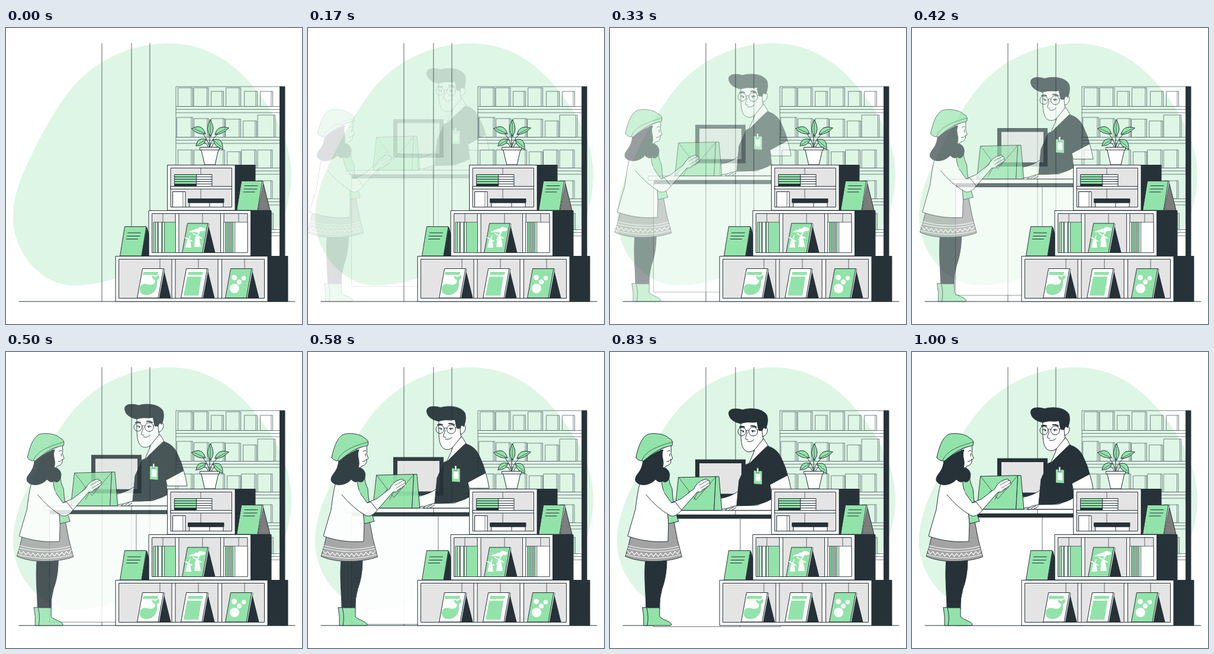
These frames come from a looping animation (500 by 500 pixels, 1.04 s). An HTML page:

```html
<!DOCTYPE html>
<html lang="en">
<head>
<meta charset="utf-8">
<title>Bookshop counter</title>
<style>
html, body { margin: 0; width: 100%; height: 100%; overflow: hidden; background: #fff; }
svg { display: block; width: 100%; height: 100%; stroke: #263238; stroke-width: 1; stroke-linejoin: round; stroke-linecap: round; fill: none; }
.w { fill: #fff; }
.g { fill: #92e3a9; }
.d { fill: #263238; }
.i { fill: #e4e4e4; }
.n { stroke: none; }
.thin { stroke-width: .7; }
.back { stroke: #56666a; stroke-width: .8; }
</style>
</head>
<body>
<svg viewBox="0 0 500 500">
  <path class="n" fill="#def6e5" d="M272 26C340 24 390 62 425 108C460 152 482 200 482 247C482 300 462 350 430 365C350 395 270 390 190 421C165 430 135 435 113 435C60 434 12 380 12 320C12 290 22 260 30 243C53 192 78 144 107 107C145 58 205 27 272 26Z"/>
  <path d="M162 26V462M212 26V462M243 26V462" stroke="#455358" stroke-width=".9"/>
  <g id="bookcase" class="back"></g>
  <path class="d" d="M463 99h8v286h-8z"/>
  <path d="M22 462H488" stroke-width="1.2"/>

  <g class="drop">
    <path class="d n" d="M144 179.500h85v65h-85z"/>
    <path class="i n" d="M151 186h71v51.500h-71z"/>
  </g>

  <g class="drop">
    <path class="w thin" d="M74 279h214v183H74zM220 279V462"/>
    <path class="w thin" d="M65 266h222v7H65zM212 266v7"/>
    <path class="d n" d="M74 273h214v6.500H74z"/>
  </g>

  <g class="drop">
    <path class="w" d="M217 233C208 240 198 243 186 246V264C198 262 208 262 215 257Z"/>
    <path class="w" d="M246 158L242 170L234 188L268 158L260 145Z"/>
    <path class="w" d="M270 222L300 206Q304 218 306 232H273Z"/>
    <path class="w" d="M214 258L248 257L274 246V265.500H194Q202 259 214 258M201 264l8-4M206 265l7-4"/>
    <path class="d" d="M266 157C281 161 287 171 291 181Q297 193 300 206L270 222L273 246C260 256 232 259 214 257L218 215L230 188L236 186L251 171Z"/>
    <path class="w" d="M221 119C221 137 220 154 226 162C231 169 241 168 246 161L258 146L261 122L251 113Z"/>
    <path class="w" d="M257 126Q265 121 266 130Q266 138 258 141Z"/>
    <path class="d" d="M201 104C198 94 211 92 224 96C236 92 258 93 265 105C268 114 265 123 263 128Q259 123 257 131H252C249 126 250 121 248 116C241 119 228 114 221 119C211 117 202 112 201 104Z"/>
    <g fill="none">
      <circle cx="223" cy="132.500" r="7"/><circle cx="242" cy="132.500" r="7.500"/>
      <path d="M230 131q2-2 5 0M249 130l9-2M232 134q-4 10-3 11q2 2 4 1M232 149q7 2 11-3"/>
      <path d="M219 125q4-2 8 0M238 123q5-1 9 2" stroke-width="2"/>
      <path d="M221 131q3-1 5 1M239 131q3-1 6 1" stroke-width="1.300"/>
    </g>
    <circle class="d n" cx="225" cy="132.500" r="1.300"/><circle class="d n" cx="241" cy="132.500" r="1.300"/>
    <path class="g thin" d="M243 198l14 1v23l-14-1z"/>
    <path class="w n" d="M246 204l8 .5v12l-8-.5z"/>
    <path class="w thin" d="M248 194h3v8h-3z"/>
  </g>

  <g class="drop">
    <path class="g" d="M116 210L179 208.500L176 265.500H110Z"/>
    <path class="g" d="M179 208.500H184L189 265.500H176Z"/>
    <path class="thin" d="M116 210L145 248L179 208.500M110 265L134 234"/>
  </g>

  <g id="visitor">
    <path class="d" d="M58 350H94C94 374 90 389 86 400Q81 417 82 434H59C59 410 55 380 58 350Z"/>
    <path class="g" d="M53 432L63 431V462H55Q56 446 53 432Z"/>
    <path class="g" d="M60 432H82V447C87 453 99 454 102 460L101 462H61Q64 447 60 432Z"/>
    <path fill="#a3a3a3" d="M33 312Q29 330 24 345C50 357 92 356 119.500 346Q111 317 106 286L96 289Z"/>
    <g stroke="#fff" stroke-width="1.200">
      <path d="M29 327Q74 339 114 328M28 331Q74 343 115 332M25 342Q74 355 118 342"/>
      <path id="zigzag"/>
    </g>
    <path class="w" d="M84 164L101 157Q102 168 101 172L104 180L101 182Q102 191 92 193L86 202L80 180Z"/>
    <path class="w" d="M49 220C45 234 43 250 41 266Q34 290 28 311C48 318 70 322 96 320L97 288L92 220L78 215Z"/>
    <path class="g" d="M86 208L98 210Q97 219 103 231Q104 260 114 286L97 290Q95 255 86 225Z"/>
    <path class="w" d="M101 255L118 248L140 231C144 222 151 217 159 215Q164 214 163 217Q168 217 166 221Q169 224 163 227Q163 230 157 232L152 236L145 237L118 268Z"/>
    <path class="w n" d="M62 229C74 216 86 228 90 238L102 255L108 253L119 267C112 276 105 279 99 276L58 241Z"/>
    <path d="M90 238L102 255L108 253L119 267C112 276 105 279 99 276Q78 264 59 241"/>
    <path class="thin" d="M149 225l14-8M151 230l15-9M152 234l11-7M140 249l7-13"/>
    <path class="d" d="M54 181C68 176 77 167 88 165C83 177 91 182 87 195C94 195 101 203 98 212C96 220 91 221 87 218Q81 222 75 215C66 226 46 228 41 217C40 205 53 205 54 181Z"/>
    <path class="g" d="M42 178C45 164 50 145 62 139C72 136 90 138 97 145Q106 149 103 158C84 161 71 170 55 184Q44 184 42 178Z"/>
    <path d="M52 183C58 166 82 158 104 152" class="thin"/>
    <path d="M95 168q3-3 5-1M94 185q5 0 7-4M99 172v4"/>
  </g>

  <g id="stand"></g>
  <g id="plant">
    <path d="M344 202Q341 185 326 172M344 202V163M344 202Q347 184 367 172M342 202Q339 190 327 195M347 202Q349 192 361 193"/>
    <path class="g" d="M345 155Q355 171 345 183Q336 171 345 155Z"/>
    <path class="g" d="M314 170Q331 160 337 179Q321 180 314 170Z"/>
    <path class="g" d="M376 169Q366 180 353 180Q357 163 376 169Z"/>
    <path class="g" d="M321 199Q323 184 338 188Q334 200 321 199Z"/>
    <path class="g" d="M366 205Q353 202 350 189Q367 184 366 205Z"/>
    <path class="thin" d="M345 160V183M318 170L337 179M372 170L353 180M324 197L338 188M364 201L350 189"/>
    <path class="w" d="M330 205H359L353 231H336Z"/>
    <path class="w" d="M328 201.500h32.500v4.500H328z"/>
  </g>
</svg>
<script>
const $ = id => document.getElementById(id);
const path = (cls, d) => `<path class="${cls}" d="${d}"/>`;
const box = (cls, x, y, x2, y2) => path(cls, `M${x} ${y}H${x2}V${y2}H${x}Z`);

// Bookcase rows: left edge, width and top of each book
const rows = [
  [291,22,101, 317.5,22,101, 347,18,107, 372,22,101, 403,19,107, 430,18,107],
  [289,24,151, 318,22,153, 347,20,153, 371,23,154, 401,20,157, 425.5,27,147],
  [291,22,206, 318,22,206, 347,20,206, 374,20,209, 398,22,206, 425.5,22,206],
  [425.5,22,258],
  [430,19,313]
];
let shelf = path('', 'M287 385V99H463');
rows.forEach((row, r) => {
  const y = 132.5 + r * 52;
  shelf += path('', `M287 ${y}H463M287 ${y + 5}H463M287 ${y + 10.5}H463`);
  for (let i = 0; i < row.length; i += 3) {
    const [x, w, top] = row.slice(i, i + 3);
    shelf += box('', x, top, x + w, y) + path('', `M${x + w} ${top}h2.500V${y}`);
  }
});
$('bookcase').innerHTML = shelf;

// Display stand
const crate = (x, y, x2, side) =>
  box('d', x2, y, side, y + 76.5) + box('w', x, y, x2, y + 76.5) + box('i', x + 5.5, y + 5, x2 - 5.5, y + 71);
const book = (x, y, cls, w = 35) =>
  path('d', `M${x + w + 9} ${y + 1}l12 48.500h-21z`) +
  path('w thin', `M${x + w + 9} ${y}l2 1-9 48.500h-2z`) +
  path(cls, `M${x + 9} ${y}h${w}L${x + w} ${y + 49.5}H${x}Z`);
const dot = (x, y, r) => `<circle class="w n" cx="${x}" cy="${y}" r="${r}"/>`;
const titles = (x, y) => path('', `M${x} ${y}h22M${x - 1} ${y + 5.5}h22M${x - 2} ${y + 10.5}h19`);
const spines = (xs, y, y2, fills) => fills.split('').map((c, i) => box(c + ' thin', xs[i], y, xs[i + 1], y2)).join('');

// Top crate
let s = crate(273, 231.5, 387, 421) + path('thin', 'M329 237V248M329 272V288');
s += box('w', 278.5, 267.5, 381.5, 272);
for (let i = 0; i < 5; i++) {
  const y = 247.5 + i * 4;
  s += box(i < 4 ? 'g' : 'd', 285, y, 322, y + 4) + box('w', 322, y, 348, y + 4);
}
s += box('w', 282, 276.5, 303, 302.5) + path('thin', 'M299 276.500v26');
s += box('w', 310, 295, 367, 302.5) + path('', 'M344 295v7.500') + box('d', 308, 288.5, 368, 295);

// Lone books on the steps
s += path('d', 'M238 337l4 14V385H229Z') + path('g', 'M201 335.500H237L229 385H193Z') + titles(205.5, 346);
s += '<path fill="#7d7d7d" d="M434 260L446 308H425Z"/>' +
  path('w thin', 'M433 258.500l2 1-9 48.500h-2z') + path('g', 'M398 258.500H433L425 308H390Z') + titles(403, 266.5);

// Middle crate
s += crate(241.5, 308.5, 413.5, 448) + path('thin', 'M332 314V330M393 314V328M265 314V328');
s += box('w', 286.5, 313.5, 292, 379.5) + box('w', 363, 313.5, 368, 379.5);
s += spines([249.5, 253, 256, 258, 263, 265, 268, 286.5], 328, 379.5, 'gwgwgwg');
s += spines([368, 371, 374, 376, 379, 381, 384, 387, 408], 328, 379.5, 'wgwgwgww');
s += book(298, 330, 'g', 34);
s += path('w n', 'M308 345q5-4 10-4q2-3 6-2q3-5 8-2q5 0 5 4q-3 3-8 2q-3 4-8 2z');
s += path('w n', 'M306 358h5l2 13h-10zM320 352h6l3 18h-11z');
s += '<path stroke="#fff" stroke-width="1.800" d="M303 354l11 6M311 351l-5 12M316 347l14 8M327 344l-8 14"/>';

// Bottom crate
s += crate(185.5, 385.5, 442, 476) + path('thin', 'M260 390V407M325 390V406M403 390V406');
s += box('w', 280.5, 390.5, 286, 456.5) + box('w', 358.5, 390.5, 364.5, 456.5);
s += book(222, 406.5, 'w') + path('g n', 'M232 412H257L256 417H231Z');
s += path('g n', 'M226 441C226 432 234 431 239 433C246 435 252 433 252 426Q246 424 247 418L252 421L258 417Q261 423 255 426C257 441 249 451 237 451Q226 451 226 441Z');
s += book(296, 406.5, 'w') + path('g n', 'M308 412H333L332 417H307ZM306 420H330L325 452H300Z');
s += book(371, 406.5, 'g') + dot(385.5, 421.5, 4.5) + dot(401.5, 422.5, 3.7) + dot(394, 429, 4.2) + dot(386, 440, 8);
$('stand').innerHTML = s;

// Skirt pattern follows the hem's curve
let zig = '';
for (let i = 0; i <= 22; i++) {
  const u = i / 22;
  zig += `${i ? 'L' : 'M'}${27 + u * 89} ${334 + 22 * u * (1 - u) + (i % 2 ? 6 : 1)}`;
}
$('zigzag').setAttribute('d', zig);

const LOOP = 1040, FPS = 24;
const cubic = (a, b, u) => 3 * (1 - u) ** 2 * u * a + 3 * (1 - u) * u * u * b + u ** 3;

// Ease with overshoot: cubic-bezier(.36, -.01, .5, 1.38)
function ease(x) {
  if (x >= 1) return 1;
  let lo = 0, hi = 1;
  for (let i = 0; i < 24; i++) {
    const mid = (lo + hi) / 2;
    if (cubic(.36, .5, mid) < x) lo = mid; else hi = mid;
  }
  return cubic(-.01, 1.38, lo);
}

const drops = [...document.querySelectorAll('.drop')], visitor = $('visitor');
const start = performance.now();

function draw() {
  const t = (performance.now() - start) % LOOP;
  const step = Math.floor((t + 5) * FPS / 1000);
  const p = step < 2 ? 0 : ease(step / FPS + .036);
  const shift = 30 * (p - 1);
  for (const el of [...drops, visitor]) {
    el.setAttribute('opacity', Math.min(1, Math.max(0, p)));
    el.setAttribute('transform', el === visitor ? `translate(${shift} 0)` : `translate(0 ${shift})`);
  }
  requestAnimationFrame(draw);
}
draw();
</script>
</body>
</html>
```
